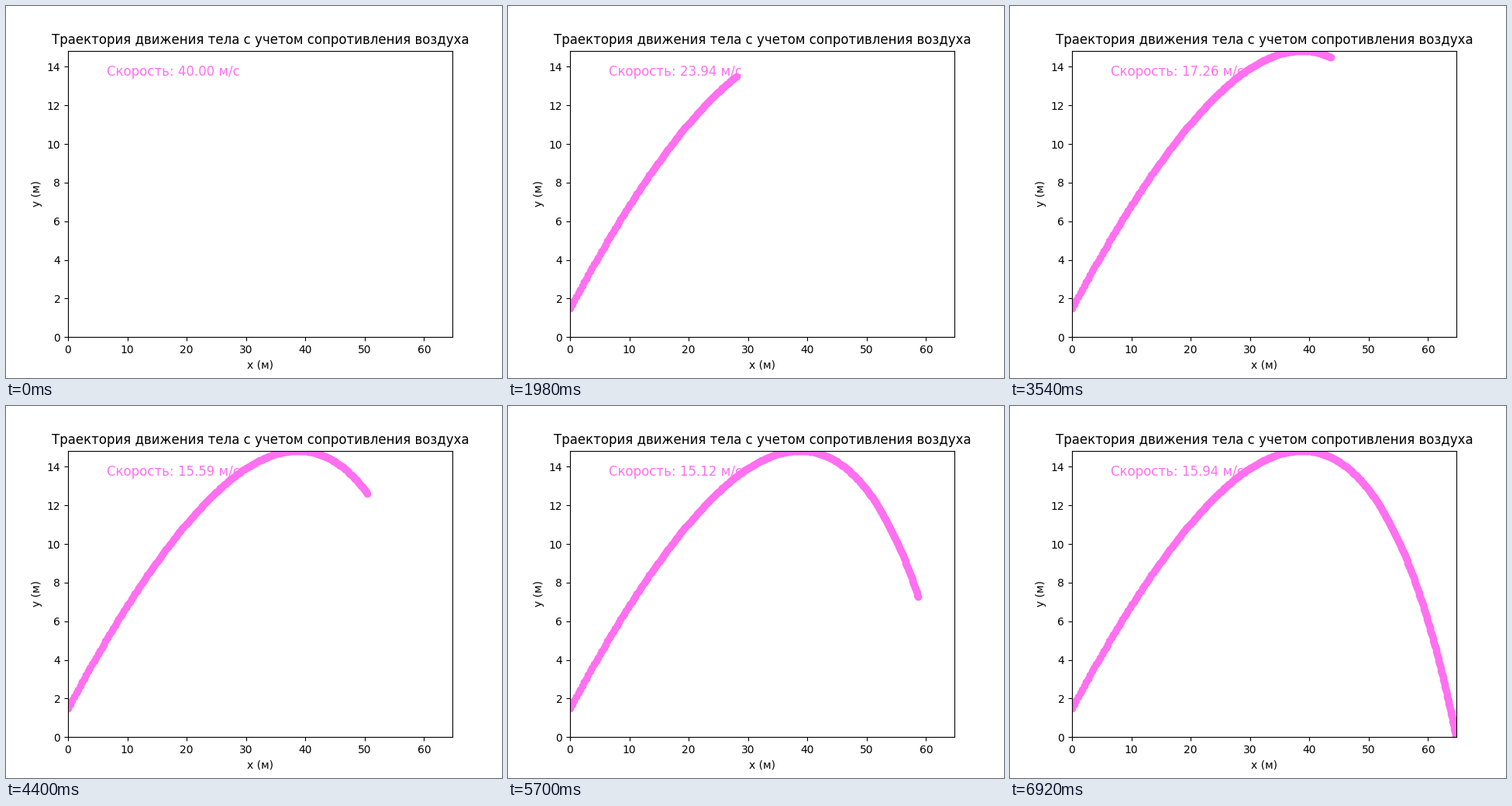
These frames come from a looping animation (640 px wide and 480 px high, 6.94 s). A matplotlib script:

```python
import numpy as np
import matplotlib.pyplot as plt
from matplotlib.animation import FuncAnimation

G = 9.81
DRAG = 0.4          # linear drag per unit mass, 1/s
V0, ANGLE = 40.0, np.radians(30)
Y0 = 1.5
DT = 0.01
STEPS = 347
PINK = "#ff70f0"

# Velocity under linear drag, position summed step by step
t = np.arange(STEPS) * DT
decay = np.exp(-DRAG * t)
vx = V0 * np.cos(ANGLE) * decay
vy = (V0 * np.sin(ANGLE) + G / DRAG) * decay - G / DRAG
speed = np.hypot(vx, vy)


def travel(v):
    return np.concatenate(([0], np.cumsum(v[1:]) * DT))


x = travel(vx)
y = Y0 + travel(vy)

plt.rcParams["font.family"] = "DejaVu Sans"
fig, ax = plt.subplots(figsize=(6.4, 4.8), dpi=100)
ax.set_xlim(0, x.max())
ax.set_ylim(0, y.max())
ax.set_xlabel("x (м)")
ax.set_ylabel("y (м)")
ax.set_title("Траектория движения тела с учетом сопротивления воздуха")

path, = ax.plot([], [], "o", color=PINK)
label = ax.text(0.1, 0.95, "", transform=ax.transAxes, fontsize=12,
                color=PINK, va="top")


def update(i):
    path.set_data(x[:i], y[:i])
    label.set_text(f"Скорость: {speed[i]:.2f} м/с")
    return path, label


anim = FuncAnimation(fig, update, frames=STEPS, interval=20,
                     repeat=True, repeat_delay=0)
plt.show()
```
